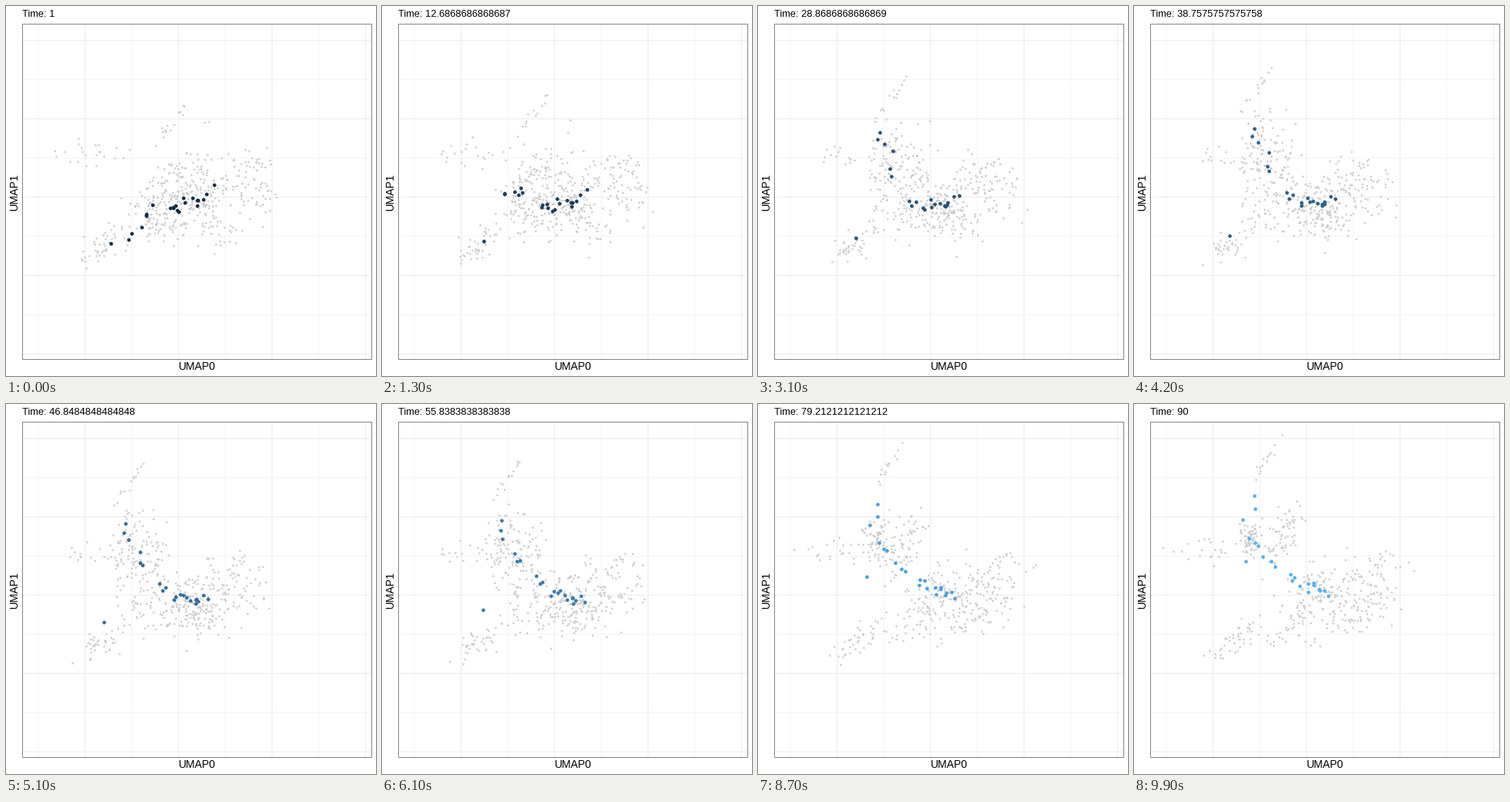
Recreate the animation shown at these times as a matplotlib script. Size 480 by 480 pixels, loop 10000 ms.

```python
import numpy as np
import matplotlib.pyplot as plt
from matplotlib.animation import FuncAnimation
from matplotlib.patches import Rectangle

SIZE, FRAMES = 480, 100
LAST = FRAMES - 1
LEFT, TOP, RIGHT, BOTTOM = 21.5, 23.5, 474.5, 458.5
LOW = np.array([19, 43, 67])
HIGH = np.array([86, 177, 247])
MID_DIP = np.array([1.5, 4, 5])

rng = np.random.default_rng(12)
plt.rcParams["font.family"] = "Liberation Sans"


class Wander:
    """Smooth random offsets that stay normally distributed over time."""

    def __init__(self, n, tilt=0.0):
        self.a, self.b = rng.normal(size=(2, n, 2)).clip(-2.3, 2.3)
        self.speed = rng.uniform(1.2, 3.6, (n, 1)) * rng.choice([-1, 1], (n, 1))
        self.tilt = tilt

    def at(self, u):
        z = self.a * np.cos(self.speed * u) + self.b * np.sin(self.speed * u)
        z[:, 1] = self.tilt * z[:, 0] + np.sqrt(1 - self.tilt ** 2) * z[:, 1]
        return z


class Cloud:
    """Swarm drifting through three centres, its spread scaled by `tight` at the end."""

    def __init__(self, n, spread, *centres, tilt=0.0, tight=1.0):
        self.wander = Wander(n, tilt)
        self.spread = np.array(spread)
        self.centres = np.array(centres)
        self.tight = tight

    def at(self, u):
        keys = [0, 0.42, 1]
        centre = [np.interp(u, keys, c) for c in self.centres.T]
        scale = np.interp(u, [0.4, 1], [1, self.tight])
        return centre + self.spread * scale * self.wander.at(u)


class Chain:
    """Points spaced along a bent line whose knots move between poses."""

    KNOTS = [0, 0.15, 0.3, 0.5, 1]

    def __init__(self, n, spread, keys, poses):
        self.s = np.linspace(0, 1, n)
        self.wander = Wander(n)
        self.spread = spread
        self.keys, self.poses = keys, np.array(poses)

    def at(self, u):
        k = min(np.searchsorted(self.keys, u, side="right") - 1, len(self.keys) - 2)
        f = (u - self.keys[k]) / (self.keys[k + 1] - self.keys[k])
        knots = self.poses[k] * (1 - f) + self.poses[k + 1] * f
        line = np.column_stack([np.interp(self.s, self.KNOTS, c) for c in knots.T])
        return line + self.spread * self.wander.at(u)


CLOUDS = [
    Cloud(105, (24, 18), (242, 245), (238, 262), (248, 245)),
    Cloud(55, (26, 18), (210, 280), (215, 262), (205, 285)),
    Cloud(65, (18, 22), (310, 240), (292, 245), (310, 245)),
    Cloud(28, (15, 13), (272, 290), (262, 278), (285, 278)),
    Cloud(65, (20, 24), (195, 262), (165, 185), (151, 174), tight=0.4),
    Cloud(65, (18, 30), (222, 238), (180, 225), (196, 165), tilt=-0.5, tight=0.65),
    Cloud(40, (16, 14), (118, 315), (122, 312), (132, 305), tilt=-0.6),
    Cloud(14, (12, 16), (212, 155), (155, 112), (169, 75), tilt=-0.95),
    Cloud(22, (28, 10), (110, 190), (135, 195), (100, 188)),
    Cloud(20, (22, 12), (312, 203), (275, 215), (315, 203)),
]

MARKED = [
    Chain(21, 4.5, [0, 0.31, 0.62, 1], [
        [(154, 307), (172, 275), (210, 256), (225, 258), (264, 242)],
        [(159, 168), (164, 190), (190, 248), (220, 258), (256, 252)],
        [(160, 150), (165, 195), (195, 218), (224, 245), (260, 257)],
        [(160, 115), (150, 172), (165, 195), (207, 232), (252, 243)],
    ]),
    Cloud(1, (0, 0), (136, 308), (124, 299), (145, 204)),
]


def positions(groups, u):
    return np.vstack([g.at(u) for g in groups])


def shade(u):
    return (LOW + (HIGH - LOW) * u - MID_DIP * 4 * u * (1 - u)) / 255


fig = plt.figure(figsize=(SIZE / 72, SIZE / 72), dpi=72, facecolor="white")
ax = fig.add_axes([0, 0, 1, 1])
ax.set(xlim=(0, SIZE), ylim=(SIZE, 0))
ax.axis("off")


def grid(x, y, rows, width):
    style = dict(colors="#ebebeb", linewidths=width, zorder=1, snap=False)
    ax.vlines(x + 121.2 * np.arange(4), TOP, BOTTOM, **style)
    ax.hlines(y + 101.6 * np.arange(rows), LEFT, RIGHT, **style)


grid(42.1, 95.6, 4, 0.55)
grid(102.7, 44.8, 5, 1.07)
ax.add_patch(Rectangle((LEFT, TOP), RIGHT - LEFT, BOTTOM - TOP, fill=False,
                       ec="#858585", lw=1, zorder=5, snap=False))

ax.text(248, 472, "UMAP0", size=14, ha="center", va="baseline")
ax.text(18.3, 241, "UMAP1", size=14, rotation=90, ha="right", va="center")
title = ax.text(21, 14, "", size=12.9, va="baseline")

dots = ax.scatter([], [], s=2.6 ** 2, c="#cccccc", linewidths=0, zorder=2)
marks = ax.scatter([], [], s=4.7 ** 2, linewidths=0, zorder=3)


def update(i):
    u = i / LAST
    title.set_text(f"Time: {1 + 89 * u:.15g}")
    dots.set_offsets(positions(CLOUDS, u))
    marks.set_offsets(positions(MARKED, u))
    marks.set_facecolor(shade(u))
    return title, dots, marks


anim = FuncAnimation(fig, update, frames=FRAMES, interval=100,
                     repeat=True, repeat_delay=0)
plt.show()
```
